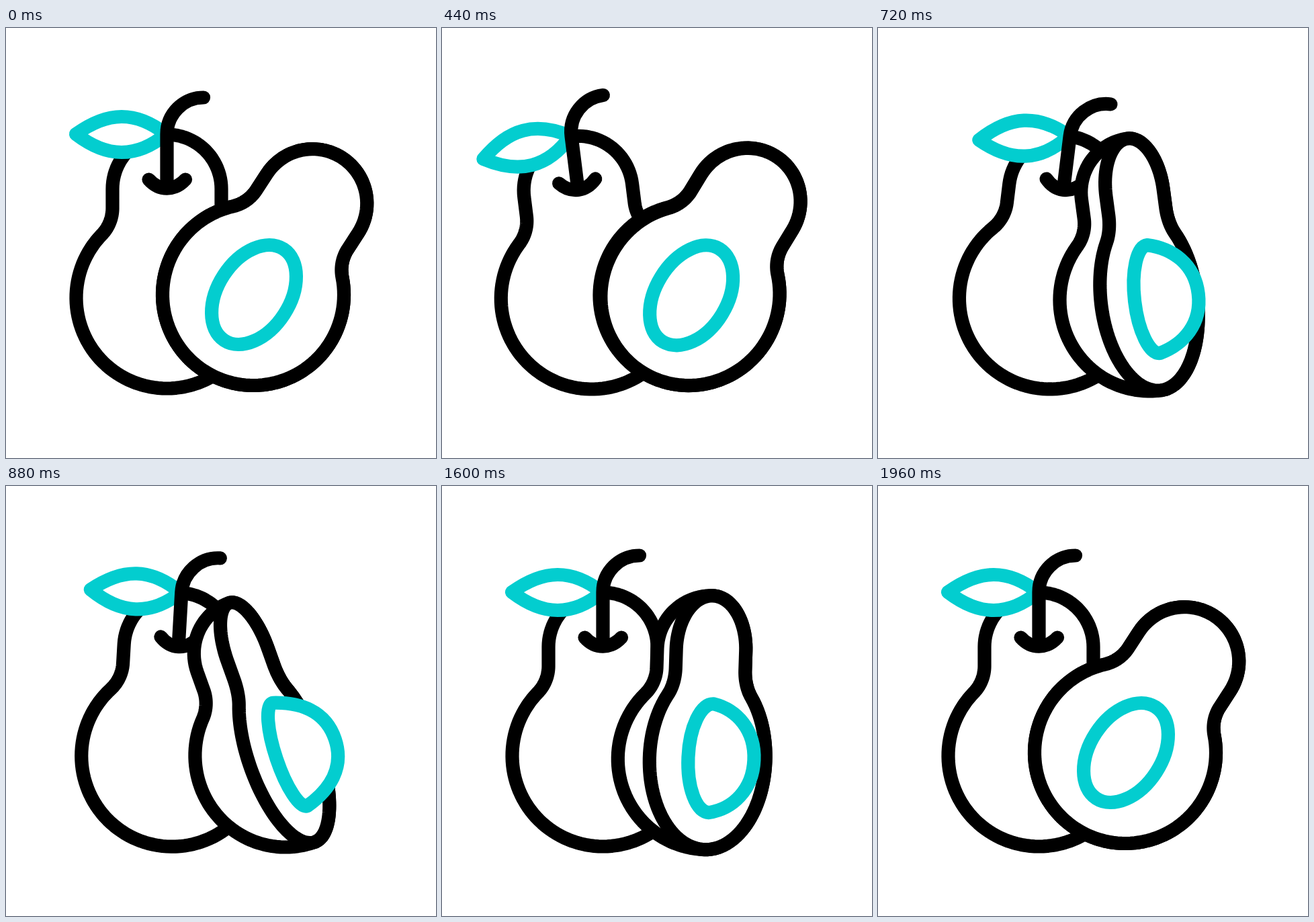
An HTML page for the animation above (2000 ms loop, 640 px wide and 640 px high).

```html
<!DOCTYPE html>
<html lang="en">
<head>
<meta charset="utf-8">
<title>Avocado</title>
<style>
  html, body { margin: 0; width: 100%; height: 100%; overflow: hidden; background: #fff; }
  svg { display: block; width: 100%; height: 100%; }
  path { fill: #fff; stroke: #000; stroke-width: 20.2; stroke-linecap: round; stroke-linejoin: round; }
  .teal { stroke: #03cdcf; }
  .line { fill: none; }
</style>
</head>
<body>
<svg viewBox="0 0 640 640">
  <g id="whole">
    <path id="body" transform="translate(239.5 401.5)"/>
    <path id="leaf" class="teal" d="M104 158C125 143 148 132 172 132S219 143 238 158C219 174 196 185 172 185S125 174 104 158Z"/>
    <path class="line" d="M294 103.5C264 103.5 239.5 128 239.5 158V237"/>
    <path class="line" d="M212.5 225.5C228 243 251 243 267 225.5"/>
  </g>
  <g id="half">
    <path id="skin"/>
    <path id="face"/>
  </g>
  <path id="seed" class="teal"/>
</svg>
<script>
const LOOP = 2000;
const $ = id => document.getElementById(id);
const lerp = (a, b, t) => a + (b - a) * t;

// Eased progress from 0 to 1 between two times.
function ramp(t, start, end) {
  const x = Math.min(1, Math.max(0, (t - start) / (end - start)));
  return x * x * (3 - 2 * x);
}

// Sway out to one side, over to the other, and back to rest.
const sway = (t, first, second, [t0, t1, t2]) =>
  first * ramp(t, 0, t0) + (second - first) * ramp(t, t0, t1) - second * ramp(t, t1, t2);

// Points on a circular arc, angles in radians.
function arc(cx, cy, r, from, to, steps = 24) {
  return Array.from({ length: steps + 1 }, (_, i) => {
    const a = lerp(from, to, i / steps);
    return [cx + r * Math.cos(a), cy + r * Math.sin(a)];
  });
}

// Right side of the fruit: neck arc, waist fillet, belly arc around the origin.
const NECK = 81, BELLY = 135, WAIST = 57, NECK_RISE = 162;
const waistX = NECK + WAIST;
const waistY = -Math.sqrt((BELLY + WAIST) ** 2 - waistX ** 2);
const touch = Math.atan2(waistY, waistX);
const side = [
  ...arc(0, -NECK_RISE, NECK, -Math.PI / 2, 0),
  ...arc(waistX, waistY, WAIST, Math.PI, Math.PI + touch),
  ...arc(0, 0, BELLY, touch, Math.PI / 2, 48)
];

const scaleX = (points, k) => points.map(([x, y]) => [x * k, y]);

function fruit(left, right) {
  const points = [...scaleX(side, right), ...scaleX(side, -left).reverse()];
  return 'M' + points.join('L') + 'Z';
}

// Stone with its own width on each side; pinch bends the right ends inwards.
function stone(left, right, pinch) {
  const h = 81, k = 0.552;
  return `M0 ${-h}
    C${right * k} ${pinch - h} ${right} ${-h * k} ${right} 0
    S${right * k} ${h - pinch} 0 ${h}
    C${-left * k} ${h} ${-left} ${h * k} ${-left} 0
    S${-left * k} ${-h} 0 ${-h}Z`;
}

const place = (el, x, y, angle) =>
  el.setAttribute('transform', `translate(${x} ${y}) rotate(${angle})`);

const spin = (el, angle, x, y) =>
  el.setAttribute('transform', `rotate(${angle} ${x} ${y})`);

function draw(t) {
  spin($('whole'), sway(t, -11.4, 7.05, [320, 708, 1040]), 239.5, 536);
  spin($('leaf'), sway(t, 45, -17, [200, 520, 960]), 238, 158);

  // 0 faces the viewer, 1 is turned to the side.
  const p = ramp(t, 390, 870) - ramp(t, 1320, 1960);
  const squash = lerp(1, 0.39, p);
  const dip = Math.sin(Math.PI * p);

  place($('half'), lerp(368, 414, p), lerp(397, 402.8, p) + 6 * dip, lerp(33, -19.7, p));
  $('skin').setAttribute('d', fruit(lerp(1, 0.98, p), squash));
  $('face').setAttribute('d', fruit(squash, squash));

  place($('seed'), lerp(369, 422.5, p), lerp(397, 399.5, p) + 7 * dip, lerp(33, -18.6, p));
  $('seed').setAttribute('d', stone(53.5 * squash, lerp(53.5, 71, p), 12 * p));
}

$('body').setAttribute('d', fruit(1, 1));

function frame() {
  draw(performance.now() % LOOP);
  requestAnimationFrame(frame);
}
frame();
</script>
</body>
</html>
```
